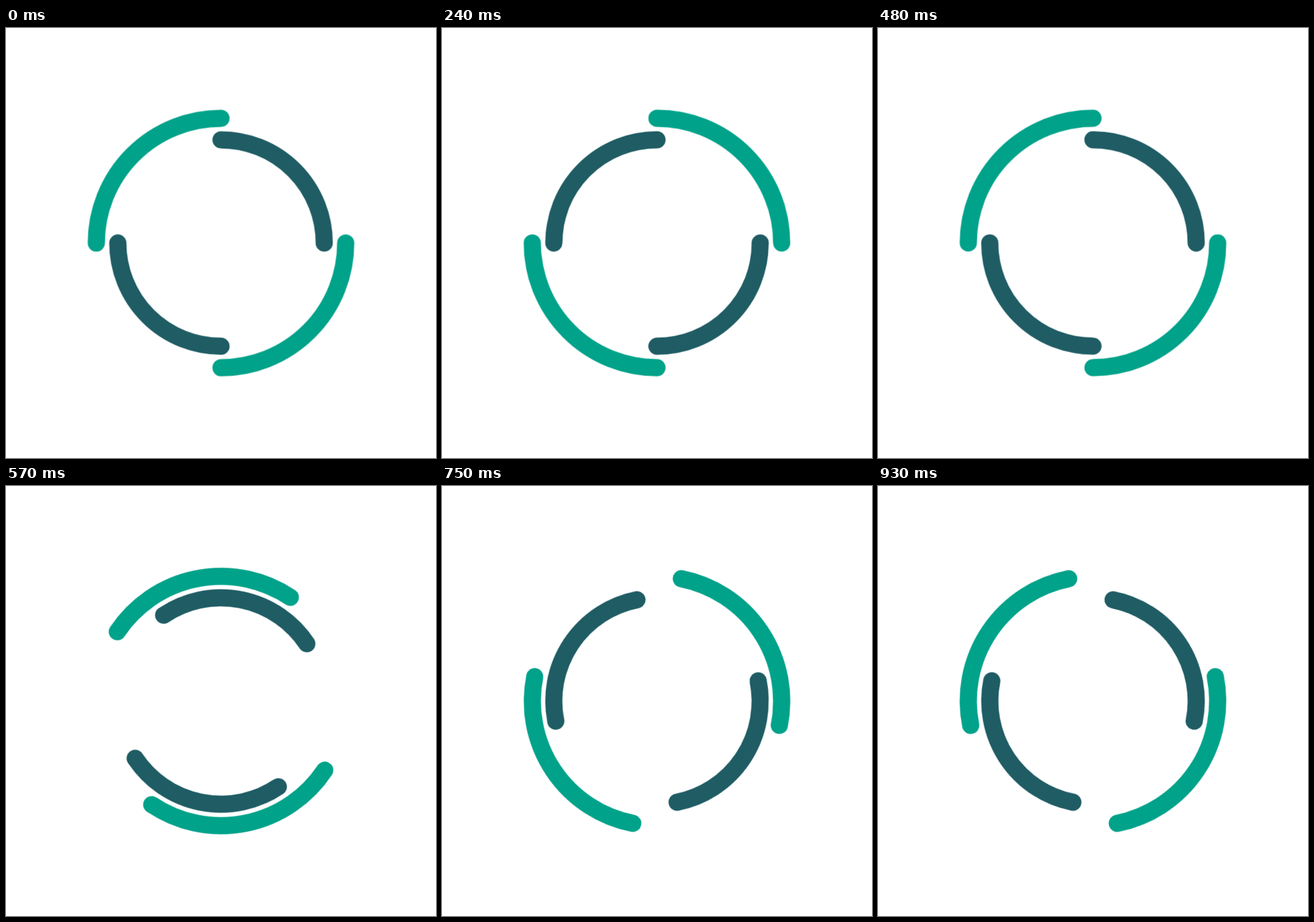
An HTML page that plays this animation: 657x657 px, repeating every 960 ms.

```html
<!DOCTYPE html>
<html lang="en">
<head>
<meta charset="utf-8">
<title>Double ring loader</title>
<style>
  html, body { margin: 0; width: 100%; height: 100%; overflow: hidden; background: #fff; }
  svg { display: block; width: 100vw; height: 100vh; }
  path {
    fill: none;
    stroke-width: 4;
    stroke-linecap: round;
    transform-origin: 0 0;
    animation: turn 960ms steps(32) infinite;
  }
  .outer { stroke: #00a28a; }
  .inner { stroke: #1f5c64; animation-direction: normal; animation-name: turn-back; }
  @keyframes turn { from { transform: rotate(0deg); } to { transform: rotate(360deg); } }
  @keyframes turn-back { from { transform: rotate(0deg); } to { transform: rotate(-360deg); } }
</style>
</head>
<body>
<svg viewBox="-50 -50 100 100">
  <path class="outer" d="M29 0A29 29 0 0 1 0 29M-29 0A29 29 0 0 1 0 -29"/>
  <path class="inner" d="M0 -24A24 24 0 0 1 24 0M0 24A24 24 0 0 1 -24 0"/>
</svg>
</body>
</html>
```
